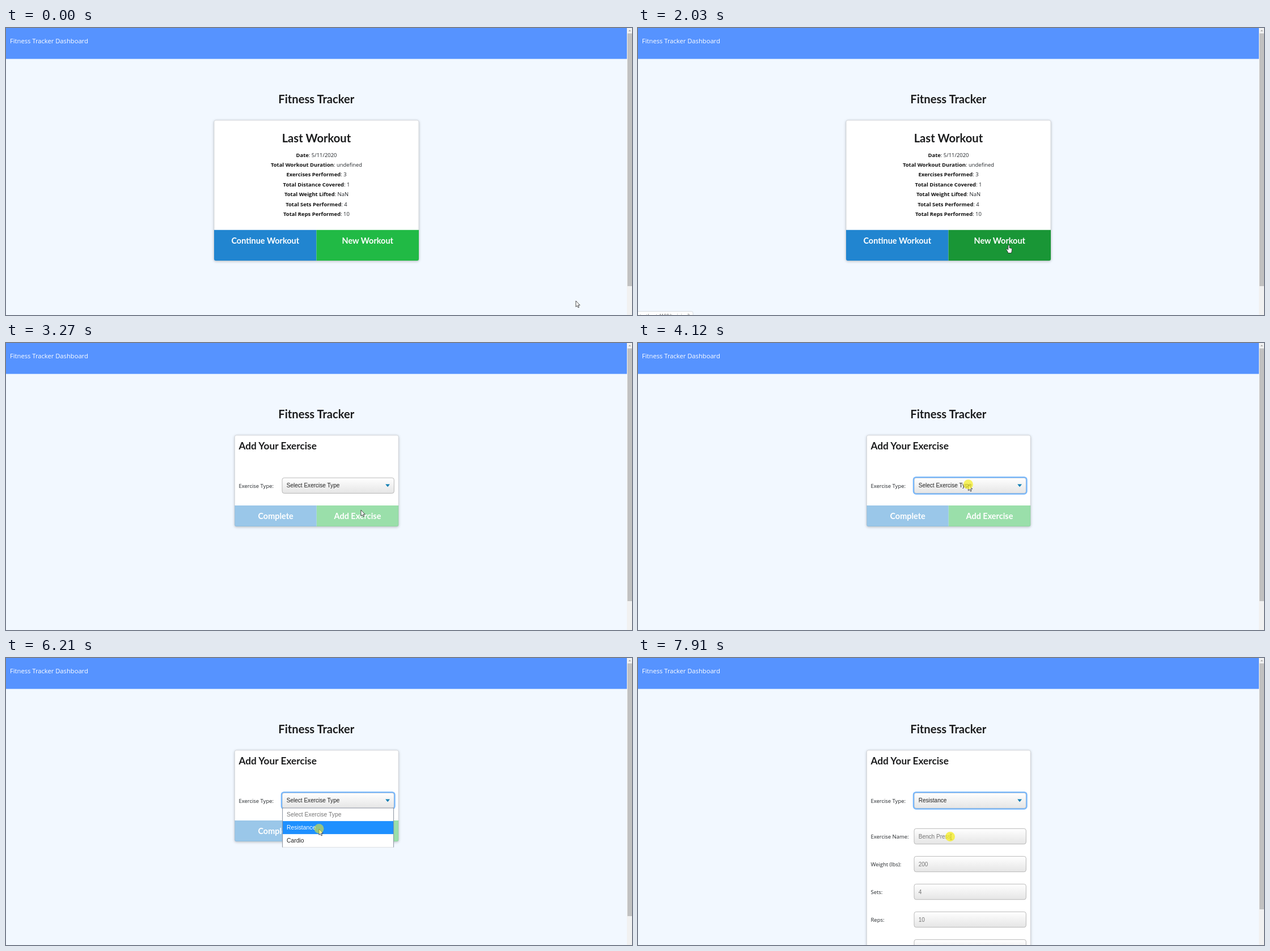
An HTML page that plays this animation: 1104 by 507 pixels, repeating every 7990 ms.

```html
<!DOCTYPE html>
<html lang="en">
<head>
<meta charset="utf-8">
<title>Fitness Tracker</title>
<style>
  html, body { margin: 0; width: 100%; height: 100%; overflow: hidden; background: #f2f8ff; }
  svg { display: block; width: 1104px; height: 507px; }
  text { font: 9.45px "Open Sans", "Noto Sans", sans-serif; fill: #212529; white-space: pre; }
  .nav { font-size: 11.2px; fill: #fff; }
  .head { font: 700 20.15px Lato, sans-serif; fill: #1b1c1d; }
  .sub { font-size: 17.25px; }
  .btn { font: 700 14.45px Lato, sans-serif; fill: #fff; }
  .mid { text-anchor: middle; }
  .strong { font-weight: 700; fill: #111; }
  .ctl { font: 10.06px "Liberation Sans", Arial, sans-serif; fill: #222; }
  .opt { font-size: 10.35px; }
  .hint { fill: #757575; }
  .card { fill: #fff; stroke: #d0d2d6; stroke-width: .8; filter: drop-shadow(0 1px 2px rgba(34, 36, 38, .28)); }
  .field { fill: url(#shade); stroke: #aaa; stroke-width: .8; }
  .ring { fill: none; stroke: #76b7fd; stroke-width: 2.3; }
  .blue { fill: #2185d0; }
  .green { fill: #21ba45; }
  .blue.hot { fill: #1678c2; }
  .green.hot { fill: #199636; }
</style>
</head>
<body>
<svg viewBox="0 0 1104 507">
  <defs>
    <linearGradient id="shade" x2="0" y2="1">
      <stop stop-color="#fff"/><stop offset="1" stop-color="#e5e5e5"/>
    </linearGradient>
  </defs>
  <rect width="1104" height="507" fill="#f2f8ff"/>
  <rect width="1095" height="54.6" fill="#5693ff"/>
  <text class="nav" x="7" y="27.4">Fitness Tracker Dashboard</text>
  <text class="head mid" x="547.3" y="133">Fitness Tracker</text>
  <rect x="1095" width="9" height="507" fill="#f1f1f1"/>
  <path d="M1097.7 5.8L1100 3.2L1102.3 5.8Z" fill="#a3a3a3"/>
  <rect id="thumb" x="1096" y="9.5" width="8" height="446.5" fill="#c1c1c1"/>

  <g id="summary"></g>
  <g id="entry"></g>

  <g id="status">
    <path d="M-1 508V500.5H94Q97 500.5 97 503.5V508Z" fill="#fff" stroke="#cfd3d8" stroke-width=".8"/>
    <text x="3" y="511.6" style="font-size:8.2px;fill:#666">testhost:4100/training?</text>
  </g>

  <g id="cursor" stroke="#222" stroke-width=".8" fill="#fff" stroke-linejoin="round">
    <path id="arrow" d="M0 0V10.6L2.4 8.4L4 12L5.6 11.3L4.1 7.7H7.2Z"/>
    <path id="hand" d="M-1.2 1.2a1.2 1.2 0 0 1 2.4 0V5l3.6.9q1 .3.9 1.4l-.5 4.2-.9 2.6h-5.4l-.9-2.2-2.4-4q-.3-1.4 1-1.2l2.2 1.6z"/>
    <path id="beam" d="M-2 -5H-.6L0 -4.4L.6 -5H2M0 -4.4V4.4M-2 5H-.6L0 4.4L.6 5H2" fill="none"/>
  </g>
  <circle id="click" r="8.5" fill="#f5ee20"/>
</svg>
<script>
const LOOP = 7990, OPENED = 3120, PICKED = 6280, LIST = 4190;
const $ = id => document.getElementById(id);
const show = (id, on) => $(id).style.display = on ? '' : 'none';

const text = (cls, x, y, s) => `<text class="${cls}" x="${x}" y="${y}">${s}</text>`;
const rect = (cls, x, y, w, h, r = 3) =>
  `<rect class="${cls}" x="${x}" y="${y}" width="${w}" height="${h}" rx="${r}"/>`;
const field = y => rect('field', 487, y, 197.4, 27.3, 3.6);

// Pair of buttons closing a card, outer bottom corners rounded
function buttons(left, right, top, bottom, textY, names) {
  const mid = (left + right) / 2, h = bottom - top - 3;
  return `<path class="blue" d="M${mid} ${top}H${left}v${h}q0 3 3 3H${mid}Z"/>
    <path class="green" d="M${mid} ${top}H${right}v${h}q0 3 -3 3H${mid}Z"/>` +
    text('btn mid', (left + mid) / 2, textY, names[0]) +
    text('btn mid', (right + mid) / 2, textY, names[1]);
}

const stats = [
  ['Date', '5/11/2020'], ['Total Workout Duration', 'undefined'],
  ['Exercises Performed', 3], ['Total Distance Covered', 1],
  ['Total Weight Lifted', 'NaN'], ['Total Sets Performed', 4],
  ['Total Reps Performed', 10]
];
$('summary').innerHTML =
  rect('card', 367, 163, 361, 248) +
  text('head mid', 547.4, 201.5, 'Last Workout') +
  stats.map(([k, v], i) => text('mid', 547.5, 227.6 + i * 17.43,
    `<tspan class="strong">${k}</tspan>: ${v}`)).join('') +
  buttons(367, 728, 356.8, 411, 381, ['Continue Workout', 'New Workout']);

const inputs = [['Exercise Name:', 'Bench Press'], ['Weight (lbs):', '200'],
  ['Sets:', '4'], ['Reps:', '10'], ['', '']];
const options = ['Select Exercise Type', 'Resistance', 'Cardio'];
$('entry').innerHTML =
  `<rect id="panel" class="card" x="403.4" y="163" width="288.8" height="161" rx="3"/>` +
  text('head sub', 410.5, 187.6, 'Add Your Exercise') +
  text('', 410.5, 255.6, 'Exercise Type:') +
  field(238.2) +
  `<rect id="ring" class="ring" x="485.9" y="237.1" width="199.6" height="29.5" rx="4.5"/>
   <text id="choice" class="ctl" x="494.7" y="255.3"></text>
   <path d="M669.2 249.6H677L673.1 254.3Z" fill="#007cb2"/>` +
  `<g id="actions">${buttons(403.4, 692.2, 287, 324, 311.2, ['Complete', 'Add Exercise'])}</g>` +
  `<g id="form">${inputs.map(([label, hint], i) => field(301.4 + i * 49) +
    text('', 410.5, 319 + i * 49, label) +
    text('ctl hint', 494.7, 318.6 + i * 49, hint)).join('')}</g>` +
  `<g id="list">
    <rect x="487.5" y="265" width="196.2" height="69.5" fill="#fff"/>
    <rect id="bar" x="488" width="195.3" height="23" fill="#1e90ff"/>
    <path d="M487.6 334.5V265H683.6V334.5" fill="none" stroke="#7b8595" stroke-width=".9"/>
    <path d="M488 334.4H683.2" stroke="#d5d8dc" stroke-width=".8"/>
    ${options.map((s, i) => text('ctl opt' + (i ? '' : ' hint'), 495, 280 + i * 23.1, s)).join('')}
  </g>`;

const blue = document.querySelector('#summary .blue');
const green = document.querySelector('#summary .green');
const rows = [...document.querySelectorAll('.opt')];

// Pointer path: time, x, y
const path = [
  [0, 1005, 482], [30, 1005, 482], [300, 860, 330], [480, 700, 235], [650, 540, 300],
  [840, 468, 388], [930, 468, 388], [1080, 415, 398], [1200, 401, 385], [1350, 430, 345],
  [1480, 510, 321], [1600, 590, 328], [1700, 645, 362], [1850, 666, 391], [2030, 654, 383.5],
  [2250, 648, 375], [2400, 652, 352], [2560, 655, 309], [2970, 626, 295], [3560, 626, 295],
  [4000, 585, 252], [4260, 583, 254], [4420, 578, 262], [4880, 563, 307], [5030, 560, 318],
  [5150, 560, 318], [5350, 552, 302], [6950, 552, 302], [7200, 585, 304], [7400, 595, 325],
  [7550, 580, 333], [7760, 552, 316], [LOOP, 552, 316]
];
const still = (a, b) => !a || !b || (a[1] === b[1] && a[2] === b[2]);

function slope(i, k) {
  const a = path[i - 1], p = path[i], b = path[i + 1];
  return still(a, p) || still(p, b) ? 0 : (b[k] - a[k]) / (b[0] - a[0]);
}

function pointer(t) {
  let i = 0;
  while (i < path.length - 2 && t >= path[i + 1][0]) i++;
  const a = path[i], b = path[i + 1], d = b[0] - a[0], u = (t - a[0]) / d;
  return [1, 2].map(k => {
    const e = u * u * (3 - 2 * u);
    return a[k] + (b[k] - a[k]) * e +
      d * u * (1 - u) * ((1 - u) * slope(i, k) - u * slope(i + 1, k));
  });
}

function clickAlpha(t) {
  if (t >= 4040 && t < 4190) return .7;
  if (t >= 6210 && t < PICKED) return .55;
  if (t >= 7830) return t < 7910 ? .55 : .75;
  return 0;
}

function draw(t) {
  const [x, y] = pointer(t);
  const home = t < OPENED, picked = t >= PICKED, open = t >= LIST && !picked;
  const within = (l, r, top, bottom) => x > l && x < r && y > top && y < bottom;

  show('summary', home);
  show('entry', !home);
  show('status', t >= 1770 && t < 2480);

  const onBlue = home && within(367, 547.5, 357, 411);
  const onGreen = home && within(547.5, 728, 357, 411);
  blue.classList.toggle('hot', onBlue);
  green.classList.toggle('hot', onGreen);

  show('ring', t >= 4040);
  show('list', open);
  show('form', picked);
  show('actions', !picked);
  $('actions').style.opacity = Math.max(.45, .6 - (t - OPENED) / 1000);
  $('panel').setAttribute('height', picked ? 400 : 161);
  $('thumb').setAttribute('height', picked ? 434.5 : 446.5);
  $('choice').textContent = options[picked ? 1 : 0];

  const row = y < 288 ? 0 : y < 311 ? 1 : 2;
  show('bar', row);
  $('bar').setAttribute('y', 265 + row * 23.1);
  rows.forEach((el, i) => el.style.fill = row && i === row ? '#fff' : '');

  const hand = onBlue || onGreen;
  const beam = picked && within(487, 684, 301.4, 328.7);
  show('hand', hand);
  show('beam', beam);
  show('arrow', !hand && !beam);
  $('cursor').setAttribute('transform', `translate(${x} ${y})`);

  const click = $('click');
  click.setAttribute('cx', x - (picked ? 1.5 : 0));
  click.setAttribute('cy', y - .5);
  click.setAttribute('opacity', clickAlpha(t));
}

const start = performance.now();
function tick() {
  draw((performance.now() - start) % LOOP);
  requestAnimationFrame(tick);
}
tick();
</script>
</body>
</html>
```
